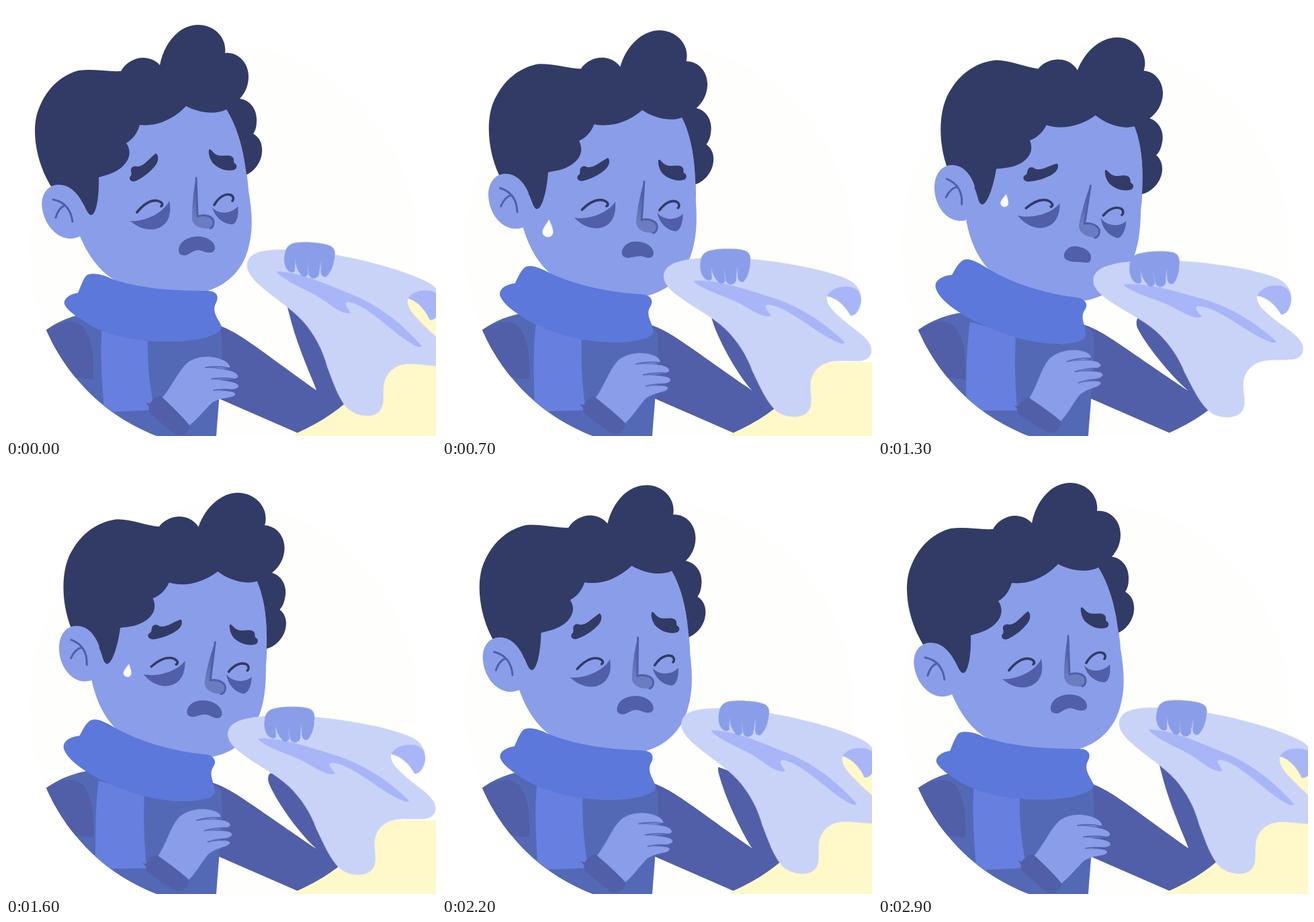
Write an HTML page without scripts that moves like this. It is 640 by 640 pixels and loops after 3 s.

```html
<!DOCTYPE html>
<html lang="en">
<head>
<meta charset="utf-8">
<title>Sneezing boy</title>
<style>
@property --t { syntax: "<number>"; inherits: true; initial-value: 0; }
@property --lean { syntax: "<number>"; inherits: true; initial-value: 0; }
@property --wave { syntax: "<number>"; inherits: true; initial-value: 0; }

html, body { margin: 0; width: 100%; height: 100%; overflow: hidden; background: #fff; }

/* --t counts tenths of a second */
body { animation: clock 3s steps(30) infinite; }
@keyframes clock { from { --t: 0; } to { --t: 30; } }

/* Each progress value rises and falls along half cosine waves */
svg {
  display: block; width: 100%; height: 100%;
  --leanIn: clamp(0, (var(--t) - 2) / 9.7, 1);
  --leanOut: clamp(0, (var(--t) - 12) / 15, 1);
  --lean: calc((cos(180deg * var(--leanOut)) - cos(180deg * var(--leanIn))) / 2);
  --waveIn: clamp(0, (var(--t) - 2.5) / 7, 1);
  --waveOut: clamp(0, (var(--t) - 11.5) / 12.5, 1);
  --wave: calc((cos(180deg * var(--waveOut)) - cos(180deg * var(--waveIn))) / 2);
}

.skin { fill: #8a9de9; }
.hair { fill: #323b66; }
.dark { fill: #505fa8; }
.line { fill: none; stroke: #505fa8; stroke-width: 3; stroke-linecap: round; }
.lid { stroke: #323b66; stroke-width: 3.6; }
.thin { stroke-width: 1.6; }
.yellow { fill: #fff8c9; }
.fold { fill: #a8b6f8; }

/* --x, --y and --turn give the offset at full lean */
.lean {
  --x: 0px; --y: 0px; --turn: 0deg;
  transform: translate(calc(var(--lean) * var(--x)), calc(var(--lean) * var(--y)))
             rotate(calc(var(--lean) * var(--turn)));
}
#head { --y: -3.5px; --turn: 11deg; transform-origin: 205px 450px; }
#ear { --x: -1.5px; --y: -4.5px; }
#features { --x: -2.5px; --y: -3px; }
#browL { --x: 1px; --y: 10px; --turn: 11deg; transform-origin: 206px 242px; }
#browR { --x: 1px; --y: 11px; --turn: -13deg; transform-origin: 322px 230px; }
#chestHand { --y: -5px; --turn: -9.5deg; transform-origin: 265px 630px; }
#cloth { transform: rotate(calc(7deg - 7deg * var(--wave))); transform-origin: 547px 722px; }

/* The floor and the gap show only while the cloth reaches past the edge */
#floor { opacity: calc(999 * (.85 - var(--wave))); }
#gap { opacity: calc(999 * (.4 - var(--wave))); }

.morph { animation: 3s cubic-bezier(.37, 0, .63, 1) infinite; }
#scarf { animation-name: scarf; }
@keyframes scarf {
  0%, 6.67%, 90%, 100% { d: path("M107 427C112 416 114 408 119 402C126 395 145 400 157 406C200 421 250 424 300 424C314 424 317 432 313 441C305 455 316 465 321 477C322 486 303 492 286 496C235 505 165 497 127 476C108 464 92 455 87 444C85 436 94 429 107 427Z"); }
  39%, 40% { d: path("M110 400C114 393 118 385 124 380C132 372 146 380 158 387C195 411 245 428 297 434C310 437 313 445 308 452C300 463 308 473 309 488C309 500 290 502 272 503C230 504 190 490 148 471C118 456 92 438 86 420C83 410 92 402 110 400Z"); }
}
#tail { animation-name: tail; }
@keyframes tail {
  0%, 6.67%, 90%, 100% { d: path("M143 478C139 520 144 560 146 605L221 601C214 565 210 535 211 495Z"); }
  39%, 40% { d: path("M137 470C130 520 132 560 130 602L207 602C204 560 203 530 205 490Z"); }
}
#arm { animation-name: arm; }
@keyframes arm {
  0%, 6.67%, 90%, 100% { d: path("M300 470C345 482 360 500 462 572C462 568 434 510 422 460C420 453 419 449 419 447L450 465L520 540L505 660L433 635L300 577Z"); }
  39%, 40% { d: path("M290 470C332 479 342 493 462 573C430 545 398 503 386 480C383 472 384 466 388 463L450 465L520 540L505 660L433 635L300 577Z"); }
}
#mouth { animation-name: mouth; }
@keyframes mouth {
  0%, 16.67%, 56.67%, 100% { d: path("M257 364C257 350 272 343 286 343C300 343 312 352 311 361C310 369 300 368 290 364C280 362 276 368 268 371C261 372 257 369 257 364Z"); }
  30%, 43.33% { d: path("M264 361C267 351 276 347 286 349C297 349 304 356 304 362C304 370 300 370 294 370C286 371 280 373 272 372C265 371 263 367 264 361Z"); }
}

.drop { fill: #fff; opacity: 0; animation: 3s linear infinite; }
#dropA { animation-name: dropA; }
@keyframes dropA {
  0%, 9.9% { opacity: 0; transform: translate(151px, 300px); }
  10% { opacity: 1; transform: translate(151px, 300px); }
  36.6% { opacity: 1; transform: translate(142px, 375px); }
  36.7%, 100% { opacity: 0; transform: translate(142px, 375px); }
}
#dropB { animation-name: dropB; }
@keyframes dropB {
  0%, 26.5% { opacity: 0; transform: translate(160px, 270px) scale(.72); }
  26.6% { opacity: 1; transform: translate(160px, 270px) scale(.72); }
  66.6% { opacity: 1; transform: translate(159px, 338px) scale(.75); }
  66.7%, 100% { opacity: 0; transform: translate(159px, 338px) scale(.75); }
}
</style>
</head>
<body>
<svg viewBox="0 0 640 640">
  <defs>
    <ellipse id="round" cx="323" cy="358" rx="289" ry="300"/>
    <clipPath id="disc"><use href="#round"/></clipPath>
    <linearGradient id="noseShade" x2="0" y2="1">
      <stop offset=".2" stop-color="#505fa8"/><stop offset=".8" stop-color="#6b7cc0"/>
    </linearGradient>
    <path id="tear" d="M0-13C5-4 8 2 8 6A8 7.5 0 0 1-8 6C-8 2-4-5 0-13Z"/>
  </defs>

  <use href="#round" fill="#fefefc"/>
  <path id="floor" class="yellow" d="M427 640L433 635Q470 620 500 594L540 530H640V640Z"/>
  <path id="gap" class="yellow" d="M575 430H640V515L575 450Z"/>

  <g clip-path="url(#disc)">
    <path id="arm" class="morph dark"/>
    <path fill="#5469b5" d="M30 510C60 475 90 463 120 457L300 470L320 485C324 510 320 550 313 640H30Z"/>
    <path class="dark" d="M30 510C62 470 100 462 115 478C128 495 131 520 130 556L105 553L30 580Z"/>
    <path id="tail" class="morph" fill="#677fdf"/>
  </g>

  <g id="head" class="lean">
    <path class="skin" d="M100 200L109 340C122 372 140 396 165 410L185 435L260 445C275 440 288 429 300 424C332 414 355 390 362 355C368 330 366 305 361 275C358 230 345 180 326 145L200 150Z"/>
    <path class="hair" d="M66 267C44 230 36 180 50 150C62 120 85 102 108 96C130 93 150 98 171 97C178 84 192 77 204 77C215 77 224 82 229 88C235 55 258 28 286 28C310 28 329 47 326 70C345 68 361 84 361 105C361 120 355 130 348 138C364 140 374 155 373 171C373 180 371 186 368 190C378 196 382 206 381 218C380 232 370 246 358 251C353 210 342 175 328 154C310 163 285 158 268 149C250 168 225 180 199 177C196 189 188 199 179 204C190 220 180 235 168 243C158 250 148 252 138 255C139 285 134 311 127 311C121 311 118 297 112 290L90 300Z"/>
    <g id="ear" class="lean">
      <path class="skin" d="M113 291C104 275 92 265 77 266C60 267 51 283 54 302C58 328 78 348 99 346C106 345 110 343 114 340Z"/>
      <path class="line" d="M70 288C90 292 97 305 99 321M74 315C77 304 82 299 87 297"/>
    </g>
    <g id="features" class="lean">
      <path id="browL" class="lean hair" d="M224 220C228 224 227 232 221 239C213 249 202 256 196 259C190 263 184 261 184 256C185 252 188 253 186 246C185 240 190 237 196 239C206 238 212 228 221 221C222 220 223 219 224 220Z"/>
      <path id="browR" class="lean hair" d="M302 214C304 211 307 217 311 220C319 226 329 220 336 224C341 227 338 232 340 234C345 236 344 243 339 244C327 247 315 241 308 234C303 228 301 219 302 214Z"/>
      <path class="dark" d="M185 320C205 322 235 308 243 290C248 315 238 328 222 332C205 335 192 326 185 320ZM307 300C318 312 338 308 345 298C347 312 343 325 336 325C322 324 311 314 307 300Z"/>
      <path class="line lid" d="M195 307C204 296 215 288 226 290C233 292 234 296 231 298M310 296C317 284 326 279 334 281C339 283 339 288 337 290"/>
      <path fill="url(#noseShade)" d="M283 254C278 280 277 300 277 318C280 330 292 332 303 331C311 329 311 318 305 313C298 310 290 312 286 312Z"/>
      <path class="line" d="M283 256L285 313C298 309 309 314 309 322C309 327 307 330 304 331"/>
      <path id="mouth" class="morph dark"/>
    </g>
    <use id="dropA" class="drop" href="#tear"/>
    <use id="dropB" class="drop" href="#tear"/>
  </g>

  <path id="scarf" class="morph" fill="#5c78db"/>

  <g id="chestHand" class="lean">
    <path class="skin" d="M230 586C247 567 255 545 270 531C285 519 310 520 325 528C331 531 334 536 333 538C328 542 315 537 297 538C325 540 342 543 345 550C347 556 335 556 305 555C330 558 346 560 346 566C344 572 330 571 310 572C328 573 341 573 341 578C338 585 318 581 305 592C292 605 285 615 272 625Z"/>
    <path class="line thin" d="M297 538Q315 535 332 539M306 555Q325 552 343 556M309 572Q325 569 341 572"/>
    <path class="dark" d="M208 590L214 592C218 586 224 580 231 581C243 592 262 610 273 624C274 632 266 640 254 639C238 628 222 612 213 604C211 600 216 598 208 590Z"/>
  </g>

  <g id="cloth">
    <path fill="#c9d3f8" d="M319 408C321 388 350 383 385 380C440 376 530 384 585 402C604 408 615 420 614 437C613 449 607 459 599 459C592 447 580 434 563 431C561 444 575 455 590 467C608 481 622 488 629 500C637 514 628 526 612 526C590 528 563 522 548 545C536 565 550 583 543 600C536 616 508 615 494 605C478 592 467 567 456 547C446 522 432 502 412 484C380 456 317 436 319 408Z"/>
    <path class="fold" d="M563 431C568 420 580 416 592 416C603 415 614 421 614 437C613 449 607 459 599 459C592 447 580 434 563 431ZM365 415C400 412 440 425 470 433C520 445 560 470 592 499C590 505 575 497 560 489C535 475 500 448 476 447C467 448 475 455 481 463C470 467 455 458 440 450C420 438 385 432 365 417Z"/>
    <path class="skin" d="M373 388C373 376 379 370 392 368C408 365 425 365 437 367C446 369 448 376 447 386C447 398 443 409 438 414C433 416 429 412 429 405L428 390L427 413C424 420 415 421 412 414L407 392L411 413C409 420 402 419 399 414C393 408 390 400 389 391L391 411C388 417 380 413 376 406C373 400 372 394 373 388Z"/>
  </g>
</svg>
</body>
</html>
```
